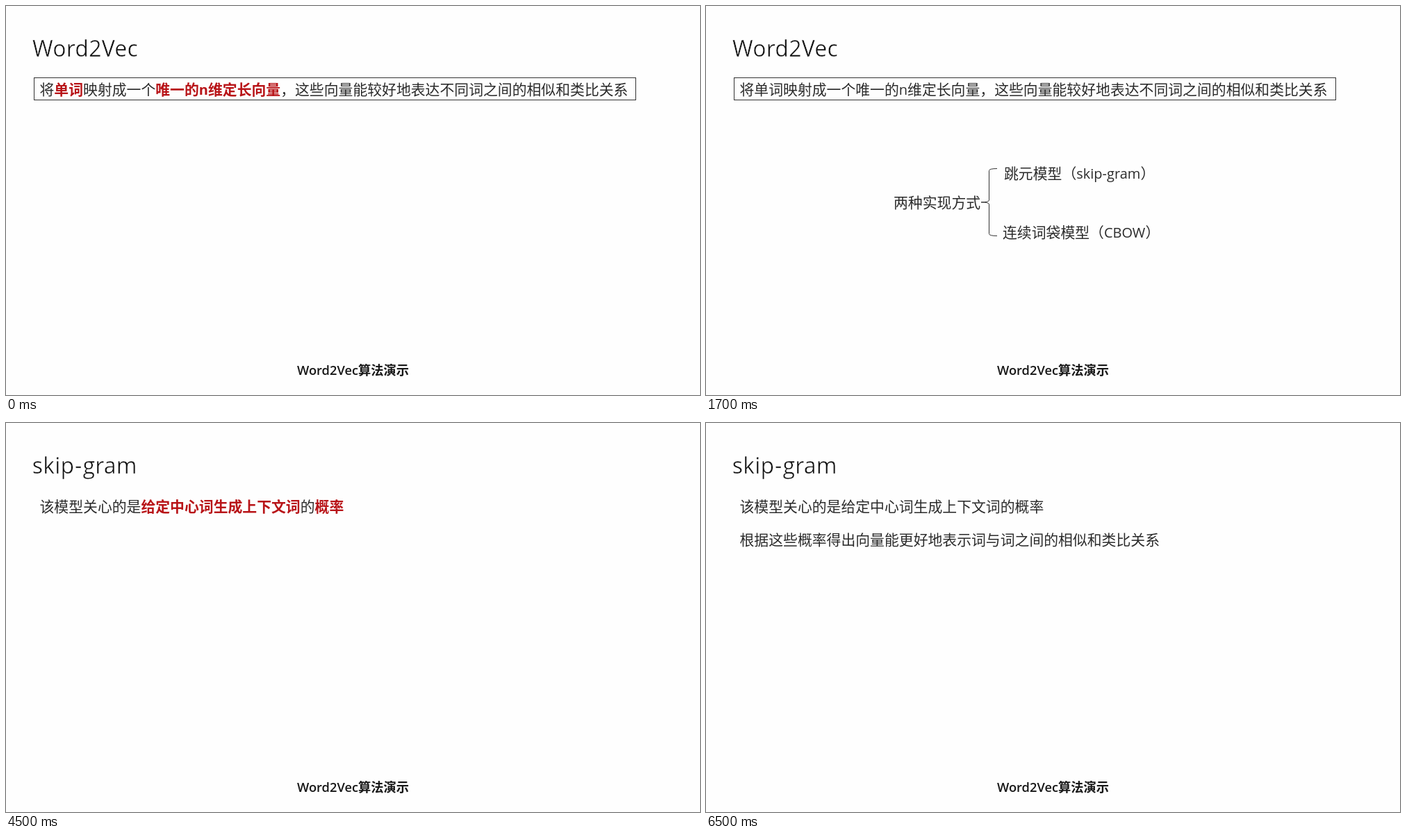
An HTML page for the animation above (8 s loop, 999 by 561 pixels).

```html
<!DOCTYPE html>
<html lang="zh-CN">
<head>
<meta charset="utf-8">
<title>Word2Vec算法演示</title>
<style>
  html, body { margin: 0; width: 100%; height: 100%; overflow: hidden; background: #fefefe; }
  svg { display: block; width: 100%; height: 100%; }
  text {
    font: 20.85px "Open Sans", "Noto Sans CJK SC", "Noto Sans CJK", sans-serif;
    fill: #2b2b2b;
    white-space: pre;
  }
  .latin { font-size: 20px; }
  /* the pale outline thins the strokes */
  .title { font-size: 32px; letter-spacing: .2px; fill: #111; stroke: #fefefe; stroke-width: .5; }
  .caption { font-size: 18.3px; font-weight: 600; fill: #181818; }
  .key { font-weight: 700; fill: #b81418; }
  .line { fill: none; stroke: #333; stroke-width: 1; }

  .scene { opacity: 0; animation: 8s step-end infinite; }
  .intro { animation-name: intro; }
  .define { animation-name: define; }
  .models { animation-name: models; }
  .skip { animation-name: skip; }
  .focus { animation-name: focus; }
  .result { animation-name: result; }
  @keyframes intro { 0% { opacity: 1 } 31.25%, 100% { opacity: 0 } }
  @keyframes define { 0% { opacity: 1 } 6.25%, 100% { opacity: 0 } }
  @keyframes models { 0% { opacity: 0 } 6.25% { opacity: 1 } 31.25%, 100% { opacity: 0 } }
  @keyframes skip { 0% { opacity: 0 } 31.25%, 100% { opacity: 1 } }
  @keyframes focus { 0% { opacity: 0 } 56.25% { opacity: 1 } 81.25%, 100% { opacity: 0 } }
  @keyframes result { 0% { opacity: 0 } 81.25%, 100% { opacity: 1 } }
</style>
</head>
<body>
<svg viewBox="0 0 999 561">
  <g class="scene intro">
    <text class="title" x="38" y="73">Word2Vec</text>
    <rect class="line" x="40.5" y="103.5" width="866" height="32"/>
  </g>

  <g class="scene define">
    <text x="48.5" y="127.6">将<tspan class="key">单词</tspan>映射成一个<tspan class="key">唯一的<tspan class="latin">n</tspan>维定长向量</tspan>，这些向量能较好地表达不同词之间的相似和类比关系</text>
  </g>

  <g class="scene models">
    <text x="48.5" y="127.6">将单词映射成一个唯一的<tspan class="latin">n</tspan>维定长向量，这些向量能较好地表达不同词之间的相似和类比关系</text>
    <text x="270" y="290.7">两种实现方式</text>
    <path class="line" d="M419 234.5Q407.5 234.5 407.5 237.5V280Q407.5 283 396 283Q407.5 283 407.5 286V328.5Q407.5 331.5 419 331.5"/>
    <text x="429" y="248.7">跳元模型（<tspan class="latin">skip-gram</tspan>）</text>
    <text x="427" y="333.7">连续词袋模型（<tspan class="latin">CBOW</tspan>）</text>
  </g>

  <g class="scene skip">
    <text class="title" x="37.8" y="73">skip<tspan dx=".6">-</tspan><tspan dx="1">gram</tspan></text>
  </g>

  <g class="scene focus">
    <text x="48.5" y="127.6">该模型关心的是<tspan class="key">给定中心词生成上下文词</tspan>的<tspan class="key">概率</tspan></text>
  </g>

  <g class="scene result">
    <text x="48.5" y="127.6">该模型关心的是给定中心词生成上下文词的概率</text>
    <text x="48.5" y="175.8">根据这些概率得出向量能更好地表示词与词之间的相似和类比关系</text>
  </g>

  <text class="caption" x="419" y="532.4">Word2Vec算法演示</text>
</svg>
</body>
</html>
```
